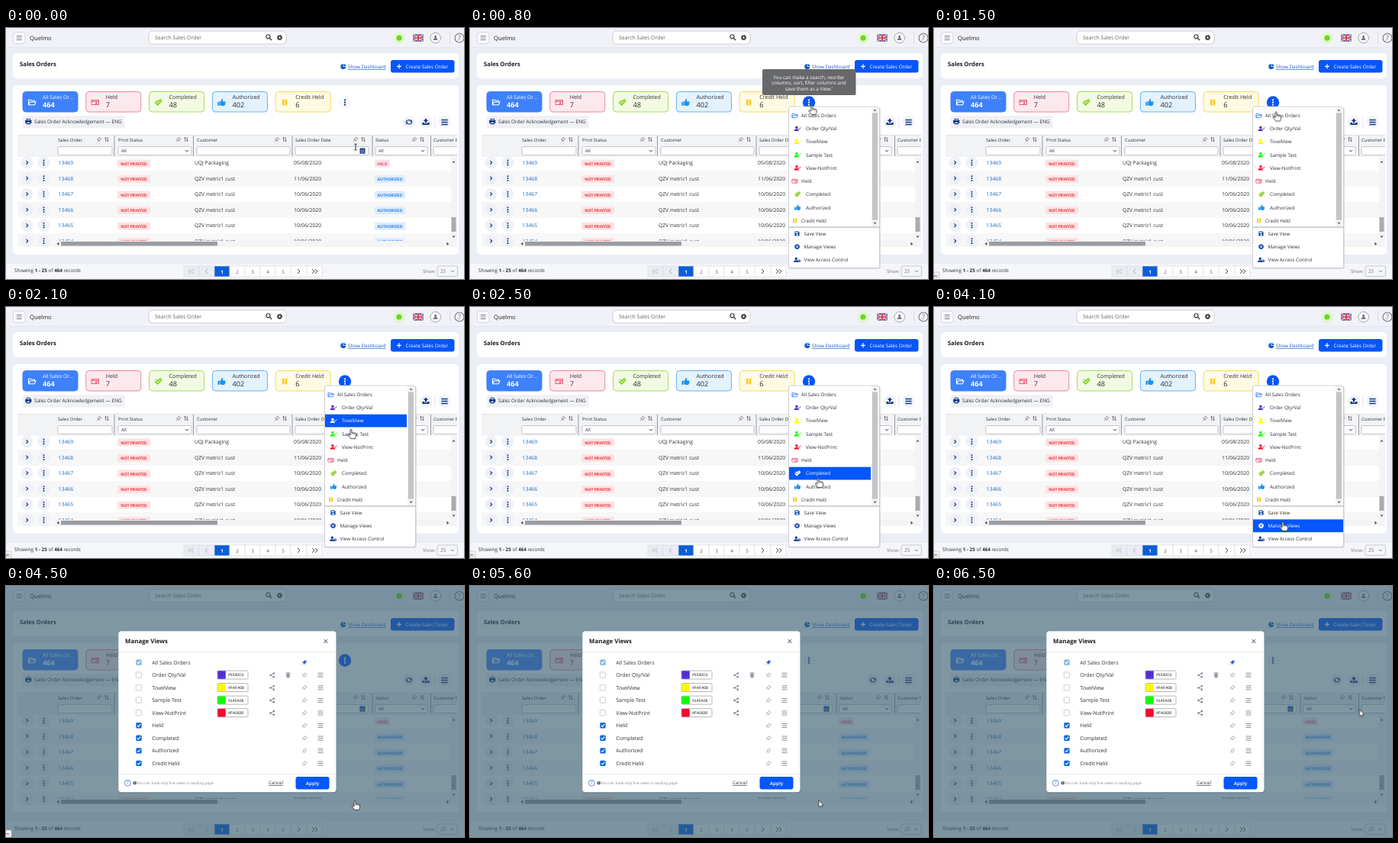
Animation of 600 by 329 pixels, one loop 6600 ms. Source, as an HTML page:

```html
<!DOCTYPE html>
<html lang="en">
<head>
<meta charset="utf-8">
<title>Manage Views</title>
<style>
html,body{margin:0;width:100%;height:100%;overflow:hidden;background:#eceef6}
svg{display:block;width:600px;height:329px}
text{font-family:"Open Sans","Noto Sans",sans-serif;text-rendering:geometricPrecision;white-space:pre}
.hex{font-family:"Liberation Sans",Arial,sans-serif}
</style>
</head>
<body>
<svg viewBox="0 0 600 329"></svg>
<script>
const LOOP = 6600, BLUE = '#0556fb', NAVY = '#153a80', INK = '#2c2f36';
const SEMI = 'font-weight="600"', BOLD = 'font-weight="700"', MID = 'text-anchor="middle" ';

// Drawing helpers
const T = (x, y, s, size = 6.5, fill = INK, more = '') =>
  `<text x="${x}" y="${y}" font-size="${size}" fill="${fill}" ${more}>${s}</text>`;
const R = (x, y, w, h, fill, rx = 0, more = '') =>
  `<rect x="${x}" y="${y}" width="${w}" height="${h}" fill="${fill}" rx="${rx}" ${more}/>`;
const C = (x, y, r, fill, more = '') => `<circle cx="${x}" cy="${y}" r="${r}" fill="${fill}" ${more}/>`;
const F = (d, fill, more = '') => `<path d="${d}" fill="${fill}" ${more}/>`;
const P = (d, stroke, w = 1, more = '') => F(d, 'none', `stroke="${stroke}" stroke-width="${w}" ${more}`);
const line = (stroke, w = .7) => `stroke="${stroke}" stroke-width="${w}"`;
const at = (x, y, s, k = 1) => `<g transform="translate(${x} ${y}) scale(${k})">${s}</g>`;
const G = (id, s) => `<g id="${id}">${s}</g>`;
const each = (list, f) => list.map(f).join('');

// Icons, centred on the origin
const icon = {
  dots: c => each([-3.2, 0, 3.2], y => C(0, y, 1.15, c)),
  bars: (c, w = .9) => P('M-3.5-2.5h7M-3.5 0h7M-3.5 2.5h7', c, w),
  pin: (c, fill = 'none') => F('M.6-3.3 3.3-.6 2.2-.2.7 1.3.5 2.6-2.6-.5-1.3-.7.2-2.2zM-1.2 1.2-3.2 3.2', fill, line(c, .7)),
  sort: c => P('M-1.5 3V-3M-2.8-1.6-1.5-3-.2-1.6M1.5-3V3M.2 1.6 1.5 3 2.8 1.6', c, .7),
  chev: c => P('M-2-1.2 0 1.2 2-1.2', c, .9),
  folder: c => F('M-4 3V-3h3l1 1h3.2v1.5M-4 3-2.4-.5H4.6L3 3z', 'none', line(c, 1)),
  held: c => P('M-4.2-2.7h8.4v5.4h-8.4zM-4-1h8M0 1.2h2.6M.2 2.6 2-.3', c, 1),
  checks: c => P('M-2.6-2.2-.8-.4 3-4M-4 0-.9 3 4.4-2.4', c, 1.7),
  thumb: c => F('M-4.5-.7h2v4.6h-2zM-2-.5C-.5-1.5 0-2.6 0-4.3 1.6-4.4 2-2.8 1.4-1.2H4.2C5 0 4.6 3.4 3 4H.4L-2 3.2z', c),
  pause: c => R(-2.8, -3.5, 2.2, 7, c) + R(.6, -3.5, 2.2, 7, c),
  user: c => C(-1.3, -2, 1.9, c) + F('M-5 3.5C-5 1-3.5.3-1.3.3S2.2 1 2.2 3.5z', c),
  userCheck: c => icon.user(c) + P('M1.4-.6 2.7.6 5-2', c, 1),
  userGear: c => icon.user(c) + C(3.3, 1.3, 1.4, 'none', line(c, 1.2)),
  gear: c => C(0, 0, 2.2, 'none', line(c, 1.7)) + C(0, 0, 3.5, 'none', line(c, 1.2) + ' stroke-dasharray="1.5 1.25"'),
  save: c => F('M-3.5-3.5h5.5l1.5 1.5v5.5h-7zM-2.3-2.4v1.7h3.7v-1.7zM0 .4a1.2 1.2 0 1 0 .1 0z', c, 'fill-rule="evenodd"'),
  share: c => P('M2.3-2.2-2 0 2.3 2.2', c, .7) + C(2.3, -2.3, 1.2, c) + C(-2, 0, 1.2, c) + C(2.3, 2.3, 1.2, c),
  trash: c => F('M-3-3.2h1.8l.5-.6h1.4l.5.6H3v1h-6zM-2.5-1.6h5l-.3 5.2h-4.4z', c),
  print: c => F('M-2.5-3.7h5v2h1.6v4H2.6v1.4h-5.2V2.3h-1.5v-4h1.6zM-1.6-2.8v1.3h3.2v-1.3zM-1.6 1v1.6h3.2V1z', c, 'fill-rule="evenodd"'),
  sync: c => P('M-4 .2C-3.6-3 .5-3.4 2.6-1.6M4-.2C3.6 3-.5 3.4-2.6 1.6', c, 1.1) + F('M3.9-3.3V0H.8zM-3.9 3.3V0h3.1z', c),
  upload: c => F('M0-4.4 3.2-1H1.1v2.4h-2.2V-1h-2.1zM-4.6.9h2.5v1.4h4.2V.9h2.5v3.2h-9.2z', c),
  help: c => C(0, 0, 4, 'none', line(c)) + T(0, 2.2, '?', 6, c, MID),
};

// Page behind everything
const tabs = [
  ['All Sales Or...', 464, 'folder', '#3d81fb', '#3d81fb', '#fff'],
  ['Held', 7, 'held', '#fde9ed', '#f2829b', '#ee5d7c'],
  ['Completed', 48, 'checks', '#f2fbe2', '#a5dc5a', '#86cf1e'],
  ['Authorized', 402, 'thumb', '#e4f2fc', '#64b3ea', '#1b93ee'],
  ['Credit Held', 6, 'pause', '#fffae4', '#f7dc56', '#fac80a'],
];
const columns = [
  ['Sales Order', 68, 139], ['Print Status', 147, 243, 'All'], ['Customer', 250, 372],
  ['Sales Order Date', 379, 475], ['Status', 484, 552, 'All'],
];
const rows = [13469, 13468, 13467, 13466, 13465, 13454];

function header() {
  const flag = R(-6.7, -4.8, 13.4, 9.6, '#28418f', 1) +
    P('M-6.4-4.6 6.4 4.6M-6.4 4.6 6.4-4.6', '#fff', 1.7) + P('M-6.4-4.6 6.4 4.6M-6.4 4.6 6.4-4.6', '#d8283c', .6) +
    P('M-6.7 0H6.7M0-4.8V4.8', '#fff', 3) + P('M-6.7 0H6.7M0-4.8V4.8', '#d8283c', 1.7);
  return R(0, 0, 600, 25, '#f1f2f8') + R(0, 25, 600, 1, '#e3e5ee') +
    R(9.5, 5.5, 15.5, 15, '#f8f9fc', 3, line('#c9ccd6')) + at(17.3, 13, icon.bars('#555', .7)) +
    T(31, 16, 'Quelmo', 7.7, '#222') +
    R(187, 4, 180, 17, '#fff', 5, line('#b9bcc6')) + T(195, 15.2, 'Search Sales Order', 6.95, '#666') +
    C(343.5, 11.3, 2.6, 'none', line('#333', 1.1)) + P('M345.5 13.3 348 16', '#333', 1.3) +
    at(358.5, 12.5, icon.gear('#333'), .9) +
    C(515, 13, 8, '#e0f7cf') + C(515, 13, 3.6, '#6fd61f') +
    at(540, 13, flag) +
    C(562.7, 13, 6.8, '#f8f9fc', line('#888')) + at(563.7, 13, icon.user('#666'), .75) +
    P('M581.5 5v16', '#d0d3dc', .7) + at(594, 13, icon.help('#777'), 1.5);
}

function toolbar() {
  return R(9, 33, 584, 33, '#fff', 5) + R(9, 75, 584, 222, '#fff', 5) +
    T(18, 50, 'Sales Orders', 7.7, '#1c1e24', BOLD) +
    C(441.8, 50.5, 3.5, '#1358c8') + P('M442 46.8v3.7h3.6', '#fff', .8) +
    T(448, 53, 'Show Dashboard', 6.27, '#1358c8', 'text-decoration="underline"') +
    R(504, 42, 83.5, 16.5, BLUE, 3) + P('M512 50.3h6M515 47.3v6', '#fff', 1.2) +
    T(523.5, 52.7, 'Create Sales Order', 6.4, '#fff') +
    each(tabs, ([name, n, ic, fill, edge, col], i) => {
      const x = 22 + 82.8 * i, ink = i ? INK : '#fff';
      return R(x, 83.5, 72, 26.5, fill, 4, line(edge, 1)) + at(x + 12, 97.5, icon[ic](col), 1.1) +
        T(x + 26, 93.3, name, i ? 7.1 : 6.7, ink) + T(x + 26, 104.3, n, 9.2, ink, i ? 'font-weight="500"' : BOLD);
    }) +
    C(444, 97.5, 8, '#f7f8fc') + at(444, 97.5, icon.dots(NAVY)) +
    R(22, 115, 133.5, 16.5, '#f0f1f5', 2) + at(29.3, 122.5, icon.print(NAVY)) +
    T(37, 125.2, 'Sales Order Acknowledgement — ENG', 6.44) +
    each([528, 550, 574.5], x => C(x, 123.5, 8.3, '#f1f3f9')) + P('M562 116v15', '#d5d8e0', .7) +
    at(528, 123.3, icon.sync(NAVY)) + at(550, 123, icon.upload(NAVY)) + at(574.5, 123.5, icon.bars(NAVY, 1.3), 1.2);
}

function badge(x, y, w, s, fill, ink) {
  return R(x, y - 5, w, 10, fill, 1.5) + T(x + w / 2, y + 2, s, 5.1, ink, MID + BOLD);
}

function table() {
  const head = R(15, 140, 576, 29, '#f2f3f5') + P('M15 140.5h576', '#dcdee3', .8) +
    each(columns, ([name, x, end, pick]) =>
      T(x, 148.7, name, 5.95) + at(end - 17, 146, icon.pin('#444'), .85) + at(end - 7, 146, icon.sort('#333'), .9) +
      R(x, 155.5, end - x, 11, '#fff', 1.5, line('#b5b8c0', .8)) +
      (pick ? T(x + 4, 163.3, pick, 6) + at(end - 6, 161, icon.chev('#444')) : '')) +
    R(463.5, 157.5, 7, 7.5, NAVY, 1) + P('M464.5 160h5M464.5 162h5M464.5 164h5', '#cdd6ea', .7) +
    each([142, 245.5, 375, 480, 556.5], x => P(`M${x} 141v27`, '#8d9098', .9)) +
    `<g clip-path="url(#head)">${T(560, 148.7, 'Customer PO', 5.95)}${R(560, 155.5, 50, 11, '#fff', 1.5, line('#b5b8c0', .8))}</g>`;
  const body = each(rows, (n, i) => {
    const y = 177 + 20.55 * i;
    return R(15, y - 10.3, 568, 20.5, i % 2 ? '#f7f7f8' : '#fff') + P(`M15 ${y + 10.3}h568`, '#eceded', .5) +
      C(27.5, y - .5, 8, '#eff1f7') + C(49.5, y - .5, 8, '#eff1f7') +
      P(`M26.5 ${y - 2.8}l2.2 2.3-2.2 2.3`, NAVY, 1.2) + at(49.5, y - .5, icon.dots(NAVY), .9) +
      T(68.5, y + 2, n, 6.9, '#1f6fc5') + badge(146, y + .5, 43, 'NOT PRINTED', '#fde1e2', '#e2343c') +
      T(247, y + 2, i ? 'QZV metric1 cust' : 'UQJ Packaging', 6.7) +
      T(377, y + 2, i ? (i > 1 ? '10/06/2020' : '11/06/2020') : '05/08/2020', 6.8) +
      (i ? badge(483, y + .5, 40, 'AUTHORIZED', '#dcecfe', '#2a7fe6') : badge(483, y + .5, 20, 'HELD', '#fde1e8', '#e8476c'));
  });
  const bars = R(583, 168, 8, 111, '#f4f4f5') + R(583.5, 248, 6, 19, '#a9abb0') +
    F('M584.5 176.5h4l-2-2.6zM584.5 272.5h4l-2 2.6z', '#555') +
    R(65, 279, 526, 8, '#f4f4f5') + R(72, 280, 205, 5.5, '#9b9da2') + F('M69.5 280.7v4.4l-2.8-2.2zM577.5 280.7v4.4l2.8-2.2z', '#444');
  return '<clipPath id="head"><path d="M556 140h35v29h-35z"/></clipPath><clipPath id="body"><path d="M15 168h568v111H65v8H15z"/></clipPath>' +
    `<g clip-path="url(#body)">${body}</g>` + head + bars;
}

function footer() {
  const edges = [233, 252.5, 273, 293, 313, 333, 353, 373, 394, 414];
  const arrows = ['M3-3 0 0l3 3M-1-3-4 0l3 3', 'M1.5-3-1.5 0l3 3', 'M-1.5-3 1.5 0l-3 3', 'M-3-3 0 0l-3 3M1-3 4 0 1 3'];
  return R(0, 308, 600, 21, '#f5f6fa') + P('M0 308h600', '#e0e2ea', .8) +
    T(11, 320.3, `Showing <tspan ${BOLD}>1 - 25</tspan> of <tspan ${BOLD}>464</tspan> records`, 6.35) +
    each(edges.slice(0, 9), (x, i) => {
      const w = edges[i + 1] - x, n = i - 1, on = n === 1, mid = x + w / 2;
      return R(x, 312, w, 14, on ? '#0b5ed7' : i < 2 ? '#e9ecf1' : '#fff', 0, line('#d9dce3', .7)) +
        (n > 0 && n < 6 ? T(mid, 321.6, n, 6.2, on ? '#fff' : '#555', MID + (on ? BOLD : ''))
          : at(mid, 319, P(arrows[i < 2 ? i : i - 5], i < 2 ? '#a3aab6' : '#333', .9)));
    }) +
    T(546, 320.5, 'Show:', 6, '#777') + R(565, 312, 26.5, 13.5, '#f5f6fa', 2, line('#b9bcc6', .8)) +
    T(569, 321.2, '25', 6.6, '#777') + at(585, 318.8, icon.chev('#777'));
}

// View menu: label, icon, colour, indent level, centre y, hover start and end
const items = [
  ['All Sales Orders', 'folder', '#3d81fb', 0, 115, 1600, 1800],
  ['Order Qty/Val', 'userCheck', '#5530d1', 1, 132, 1800, 2000],
  ['TovelView', 'userCheck', '#fafa08', 1, 149, 2000, 2200],
  ['Sample Test', 'userCheck', '#14fa08', 1, 166.3, 2200, 2300],
  ['View-NotPrint', 'userCheck', '#fa0830', 1, 183.5, 2300, 2400],
  ['Held', 'held', '#ee5d7c', 0, 200.8, 2400, 2500],
  ['Completed', 'checks', '#86cf1e', 1, 218, 2500, 2600],
  ['Authorized', 'thumb', '#1b93ee', 1, 235.3, 2600, 3200],
  ['Credit Held', 'pause', '#fac80a', 0, 252.5, 3200, 3600],
  ['Save View', 'save', '#15469c', 2, 269.5, 3600, 4000],
  ['Manage Views', 'gear', '#15469c', 2, 286.7, 4000, 4500],
  ['View Access Control', 'userGear', '#15469c', 2, 304],
];

function menu() {
  const entry = ([name, ic, col, level, y], ink) =>
    at([425.5, 429, 428.5][level], y, icon[ic](ink || col), .88) + T([434, 440, 437.5][level], y + 2.3, name, 6.3, ink || INK);
  return R(417, 104, 121, 212, '#000', 3, 'opacity=".1"') + R(417.5, 103, 119, 211.5, '#fff', 3, line('#c4c6cc', .8)) +
    R(526, 104, 9.5, 156, '#f3f3f4') + R(527, 111.5, 7, 140, '#c3c4c7') +
    F('M528.5 108.8h4l-2-2.6zM528.5 254.8h4l-2 2.6z', '#666') + P('M418 261h118', '#8e9198', .8) +
    each(items, (it, i) => entry(it) + (it[5] ? G('hover' + i,
      R(418, it[4] - 8.3, it[3] === 2 ? 118 : 107, 16.8, BLUE) + entry(it, '#fff')) : ''));
}

function tooltip() {
  return R(383, 54, 122.5, 34, '#67686a', 2) +
    each(['You can make a search, reorder', 'columns, sort, filter columns and', "save them as a View.'"],
      (s, i) => T(444, 67 + 7.3 * i, s, 6.4, '#fff', MID));
}

function modal() {
  const hex = { 1: '#5530D1', 2: '#FAFA08', 3: '#14FA08', 4: '#FA0830' };
  return R(147.5, 60, 285.5, 211.5, '#000', 4, 'opacity=".15"') + R(147.3, 59.3, 285.2, 211, '#fff', 4) +
    T(156, 75.2, 'Manage Views', 7.9, '#1c1e24', BOLD) + P('M416.5 70l4.6 4.8M421.1 70l-4.6 4.8', '#23407c', 1) +
    P('M148 86.5h284M148 246.5h284', '#e3e5ea', .8) +
    each(items.slice(0, 9), ([name], i) => {
      const y = 100 + 16.55 * i, on = !i || i > 4;
      return R(170.3, y - 3.7, 7.4, 7.4, on ? (i ? '#0b6be0' : '#84b8ee') : '#fff', 1.5, on ? '' : line('#b4bac4')) +
        (on ? P(`M172 ${y}l1.5 1.6 2.7-3.2`, '#fff', 1.1) : '') + T(191.3, y + 2.5, name, 6.9) +
        (hex[i] ? R(277, y - 5.5, 40, 11, '#fff', 1.5, line('#999', .7)) + R(277.3, y - 5.2, 10.5, 10.4, hex[i], 1) +
          T(291, y + 1.9, hex[i], 5.1, '#222', 'class="hex"') + at(348.5, y + .3, icon.share('#76808d')) : '') +
        (i === 1 ? at(369.5, y, icon.trash('#8f9aa8'), .95) : '') +
        at(391, y + .2, i ? icon.pin('#7a828f') : icon.pin('#1560d4', '#1560d4'), .9) + (i ? at(412, y + .2, icon.bars('#7d8591', .9)) : '');
    }) +
    at(159.3, 258.2, icon.help('#2a62c4')) + C(168.7, 258.2, 2.3, '#555') + P('M168.7 257v2.6', '#fff', .7) +
    T(171.3, 260.1, 'You can have only five views in landing page.', 4.92, '#888') +
    T(353.5, 260.2, 'Cancel', 6.2, '#333', MID + 'text-decoration="underline"') +
    R(379.5, 250, 44, 16.5, BLUE, 3) + T(401.5, 260.5, 'Apply', 6.4, '#fff', MID + SEMI);
}

function cursors() {
  return G('cursor',
    G('beam', P('M-1.8-4Q0-4 0-3 0-4 1.8-4M0-3V3M-1.8 4Q0 4 0 3 0 4 1.8 4', '#222', .9)) +
    G('arrow', F('M0 0V8.8L2 7 3.3 9.8 4.7 9.2 3.5 6.4H6z', '#fff', line('#222', .7))) +
    G('hand', F('M-1 1Q0-.4 1 1V5Q2 4 3 5.2 4 4.4 4.8 5.6 6.3 5.1 6.5 6.8V9.3Q6.2 11 5.2 12.6H-.4Q-1.4 10.6-3.6 8.2-3.9 6.6-2.3 7L-1 8.2z', '#fff', line('#222', .8)) +
      P('M1 5v2.2M3 5.2v2M4.8 5.8v1.6', '#222', .5)));
}

document.querySelector('svg').innerHTML =
  R(0, 0, 600, 329, '#eceef6') + header() + toolbar() + table() + footer() +
  G('active', C(444, 97.5, 8.2, BLUE) + at(444, 97.5, icon.dots('#fff'))) +
  G('menu', menu()) + G('tip', tooltip()) +
  G('dialog', R(0, 0, 600, 329, '#385c70', 0, 'opacity=".64"') + modal()) +
  G('status', R(-1, 320, 8, 10, '#f1f2f4', 1, line('#b5b8c0', .6)) + T(-.5, 326.8, 'rt:', 5.5, '#444')) + cursors();

// Motion: every track becomes one looping keyframe rule
let css = '';
function track(id, prop, keys) {
  const steps = each(keys, ([t, v, ease = 'step-end']) =>
    `${Math.max(0, t - 2) / LOOP * 100}%{${prop}:${v};animation-timing-function:${ease}}`);
  css += `@keyframes ${id}{${steps}}#${id}{animation:${id} ${LOOP}ms step-end infinite}`;
}
const toggle = (id, ...times) =>
  track(id, 'opacity', [...(times[0] ? [[0, 0]] : []), ...times.map((t, i) => [t, 1 - i % 2])]);

toggle('active', 400, 4700);
toggle('menu', 600, 4500);
toggle('tip', 800, 1100);
toggle('status', 1000, 4700);
toggle('dialog', 4500);
toggle('beam', 0, 200);
toggle('arrow', 200, 400, 5600);
toggle('hand', 400, 5600);
items.forEach((it, i) => it[5] && toggle('hover' + i, it[5], it[6]));

const pos = (x, y) => `translate(${x}px,${y}px)`, hops = n => `steps(${n},start)`;
track('cursor', 'transform', [
  [0, pos(458, 156)], [100, pos(458, 156), hops(7)],
  [800, pos(447.5, 101)], [1500, pos(447.5, 101), hops(7)],
  [2200, pos(452, 160), hops(5)], [2700, pos(457, 240)],
  [3100, pos(457, 240), hops(7)], [3800, pos(457, 266), hops(4)],
  [4200, pos(457, 281)], [6400, pos(457, 281), hops(2)], [6600, pos(557.5, 162)],
]);
document.head.appendChild(document.createElement('style')).textContent = css;
</script>
</body>
</html>
```
